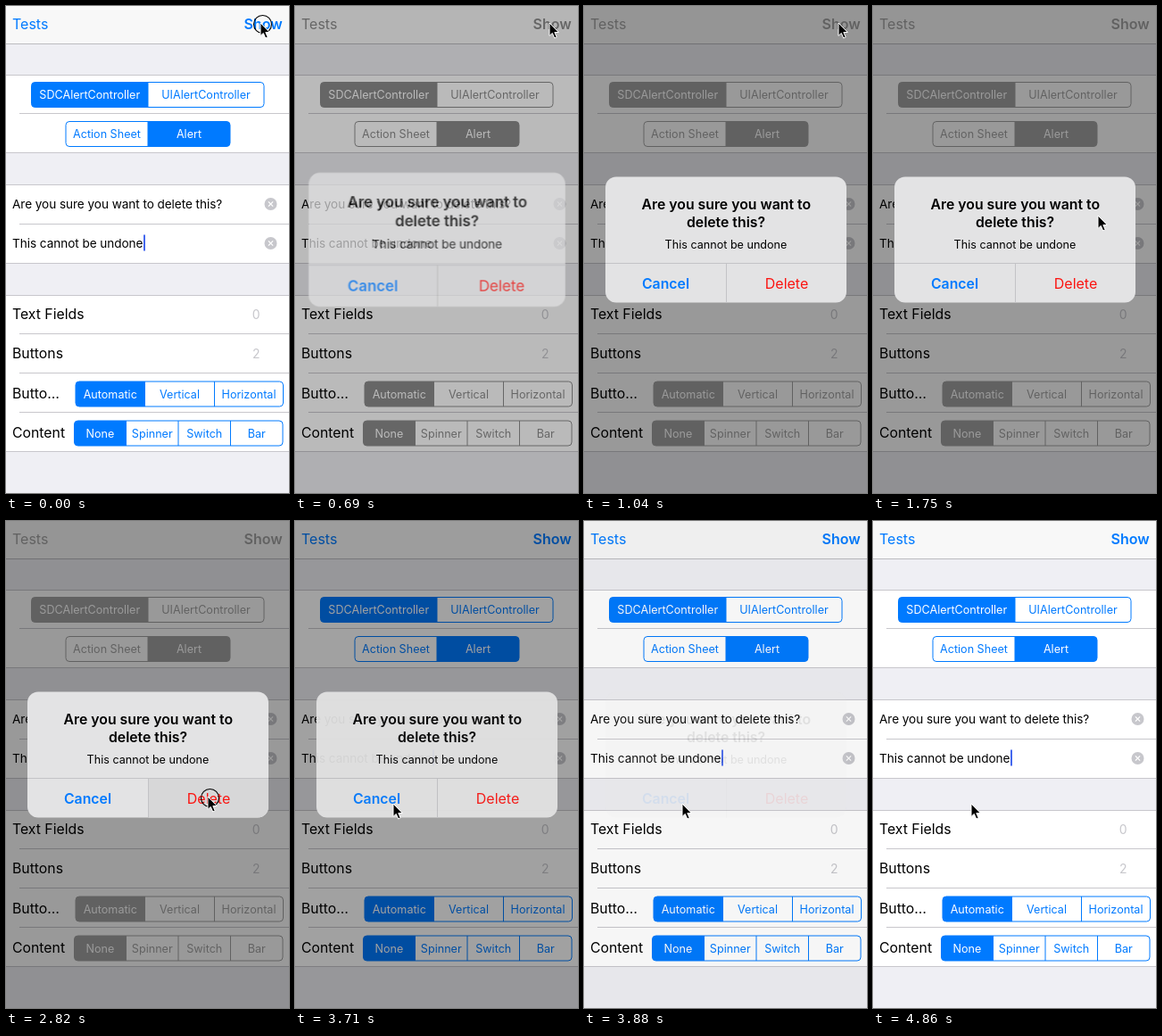
An HTML page for the animation above (4960 ms loop, 317 by 546 pixels).

```html
<!DOCTYPE html>
<html lang="en">
<head>
<meta charset="utf-8">
<title>Alert demo</title>
<style>
html, body { margin: 0; width: 100%; height: 100%; overflow: hidden; background: #efeff4; }
svg { display: block; width: 317px; height: 546px; font-family: Inter, Roboto, sans-serif; }
.mid { text-anchor: middle; }
.bold { font-weight: 600; }
.small { font-size: 12.6px; }
.field { font-size: 13.6px; letter-spacing: -.06px; }
.label { font-size: 15.8px; }
.count { font-size: 14px; fill: #c7c7cc; text-anchor: end; }
.line { stroke: #c8c7cc; fill: none; }
.tint { color: #007aff; fill: currentColor; }
.outline { fill: none; stroke: currentColor; }

/* Everything holds its pose until the next key. */
.tint, .press, #caret, #dim, #alert, #cursor, #ring { animation: 4960ms step-end infinite; }
.tint { animation-name: tint; }
.press { fill: #d7d7d8; opacity: 0; }
#press-delete { animation-name: press-delete; }
#press-cancel { animation-name: press-cancel; }
#caret { animation-name: caret; }
#dim { opacity: 0; animation-name: dim; }
#alert { opacity: 0; transform-origin: 159px 262px; animation-name: alert; }
#cursor { animation-name: cursor; }
#ring { animation-name: ring; }

@keyframes tint {
  0%, 74.79% { color: #007aff; }
  10.48% { color: #8c8c8c; }
  20.96% { color: #a2a2a2; }
}
@keyframes caret {
  0% { opacity: 1; }
  1.81% { opacity: .7; }
  3.42% { opacity: .35; }
  5.04% { opacity: 0; }
  74.79% { opacity: 1; }
  85.48% { opacity: .7; }
  87.29% { opacity: .35; }
  89.11% { opacity: 0; }
  96.37% { opacity: .5; }
  97.98% { opacity: 1; }
}
@keyframes dim {
  0% { opacity: 0; }
  10.48% { opacity: .02; }
  12.29% { opacity: .15; }
  13.91% { opacity: .27; }
  15.72% { opacity: .36; }
  17.54% { opacity: .38; }
  19.15% { opacity: .39; }
  20.96% { opacity: .4; }
  74.79% { opacity: .37; }
  76.41% { opacity: .2; }
  78.22% { opacity: .035; }
  80.04% { opacity: 0; }
}
@keyframes alert {
  0% { opacity: 0; transform: scale(1.2); }
  10.48% { opacity: .05; transform: scale(1.19); }
  12.29% { opacity: .4; transform: scale(1.12); }
  13.91% { opacity: .7; transform: scale(1.065); }
  15.72% { opacity: .89; transform: scale(1.03); }
  17.54% { opacity: .95; transform: scale(1.013); }
  19.15% { opacity: .98; transform: scale(1.005); }
  20.96% { opacity: 1; transform: none; }
  74.79% { opacity: .93; transform: none; }
  76.41% { opacity: .58; transform: none; }
  78.22% { opacity: .09; transform: none; }
  80.04% { opacity: 0; transform: none; }
}
@keyframes cursor {
  0% { transform: translate(285px, 19px); }
  30.04% { transform: translate(283px, 30px); }
  31.85% { transform: translate(277px, 78px); }
  33.46% { transform: translate(266px, 160px); }
  35.28% { transform: translate(252px, 235px); }
  37.09% { transform: translate(241px, 284px); }
  38.7% { transform: translate(233px, 304px); }
  40.52% { transform: translate(230px, 310px); }
  42.33% { transform: translate(230px, 309px); }
  56.85% { transform: translate(226px, 309px); }
  58.66% { transform: translate(206px, 311px); }
  60.48% { transform: translate(170px, 314px); }
  62.09% { transform: translate(134px, 317px); }
  63.91% { transform: translate(115px, 318px); }
  65.72% { transform: translate(110px, 317px); }
}
@keyframes ring {
  0%, 49.59% { opacity: 1; }
  6.85%, 74.79% { opacity: 0; }
}
@keyframes press-delete {
  0%, 62.09% { opacity: 0; }
  49.59% { opacity: 1; }
}
@keyframes press-cancel {
  0%, 74.79% { opacity: 0; }
  62.09% { opacity: 1; }
}
</style>
</head>
<body>
<svg viewBox="0 0 317 546">
  <rect width="317" height="546" fill="#efeff4"/>
  <rect width="317" height="42" fill="#f8f8f8"/>
  <path d="M0 42.5H317" stroke="#bcbcc0"/>
  <g class="tint" font-size="16">
    <text x="7" y="26">Tests</text>
    <text class="bold" x="266.5" y="26">Show</text>
  </g>

  <path fill="#fff" d="M0 78H317V164H0zM0 201H317V288H0zM0 325H317V499H0z"/>
  <path class="line" d="M0 77.5H317M15 120.5H317M0 164.5H317M0 200.5H317M15 244.5H317M0 288.5H317M0 324.5H317M15 367.5H317M15 411.5H317M15 455.5H317M0 499.5H317"/>

  <g class="field">
    <text x="7" y="227">Are you sure you want to delete this?</text>
    <text x="7" y="271">This cannot be undone</text>
  </g>
  <g id="clear">
    <circle cx="296.5" cy="222" r="7" fill="#c7c7cc"/>
    <path d="M293.9 219.4l5.2 5.2m0-5.2l-5.2 5.2" stroke="#fff" stroke-width="1.3"/>
  </g>
  <use href="#clear" y="44"/>
  <rect id="caret" x="154" y="256.5" width="2" height="18" fill="#4468ee"/>

  <g class="label">
    <text x="7" y="350.5">Text Fields</text>
    <text x="7" y="394.5">Buttons</text>
    <text x="7" y="439.5">Butto…</text>
    <text x="7" y="483.5">Content</text>
  </g>
  <text class="count" x="284.5" y="350.5">0</text>
  <text class="count" x="284.5" y="394.5">2</text>
  <g id="segments" class="tint small mid"></g>

  <rect id="dim" width="317" height="546"/>

  <g id="alert" class="mid">
    <rect x="24" y="191.5" width="270" height="141" rx="12" fill="#e3e3e4"/>
    <path id="press-cancel" class="press" d="M24 289H159V332.5H36a12 12 0 0 1-12-12z"/>
    <path id="press-delete" class="press" d="M294 289H160V332.5H282a12 12 0 0 0 12-12z"/>
    <path d="M24 288.5H294M159.5 289V332.5" stroke="#c3c3c6"/>
    <g class="bold label">
      <text x="159.3" y="227.5">Are you sure you want to</text>
      <text x="159" y="247.5">delete this?</text>
      <text x="91.5" y="316.5" fill="#007aff">Cancel</text>
    </g>
    <text class="small" x="159" y="271.5">This cannot be undone</text>
    <text x="227" y="316.5" font-size="16" fill="#fb1410">Delete</text>
  </g>

  <g id="cursor">
    <circle id="ring" cx="2.5" cy="1.5" r="10" fill="none" stroke="#000" stroke-width="1.1"/>
    <path d="M0 0V14.4L3.3 11.4L5.7 17L8.2 15.9L5.8 10.5H10.3z" stroke="#fff" stroke-linejoin="round"/>
  </g>
</svg>
<script>
const group = document.getElementById("segments");

function add(tag, attrs, text = "") {
  const node = document.createElementNS("http://www.w3.org/2000/svg", tag);
  for (const key in attrs) node.setAttribute(key, attrs[key]);
  node.textContent = text;
  group.append(node);
}

// edges: the x of each boundary; the chosen part sits at either end.
function segmented(y, edges, labels, chosen) {
  const height = 28, radius = 4;
  const left = edges[0], right = edges[edges.length - 1];
  const x = edges[chosen], width = edges[chosen + 1] - x;
  add("rect", { x, y, width, height, rx: radius });
  add("rect", { x: chosen ? x : x + radius, y, width: width - radius, height });
  add("rect", { class: "outline", x: left, y, width: right - left, height, rx: radius });
  labels.forEach((label, i) => {
    if (i) add("path", { class: "outline", d: `M${edges[i]} ${y}v${height}` });
    const attrs = { x: (edges[i] + edges[i + 1]) / 2, y: y + 18.5 };
    if (i === chosen) attrs.fill = "#fff";
    add("text", attrs, label);
  });
}

segmented(85.5, [28.5, 159, 289], ["SDCAlertController", "UIAlertController"], 0);
segmented(129.5, [67, 159, 251], ["Action Sheet", "Alert"], 1);
segmented(421, [78, 155.5, 233.5, 310.5], ["Automatic", "Vertical", "Horizontal"], 0);
segmented(465, [76.5, 134.5, 193, 251.5, 310], ["None", "Spinner", "Switch", "Bar"], 0);
</script>
</body>
</html>
```
